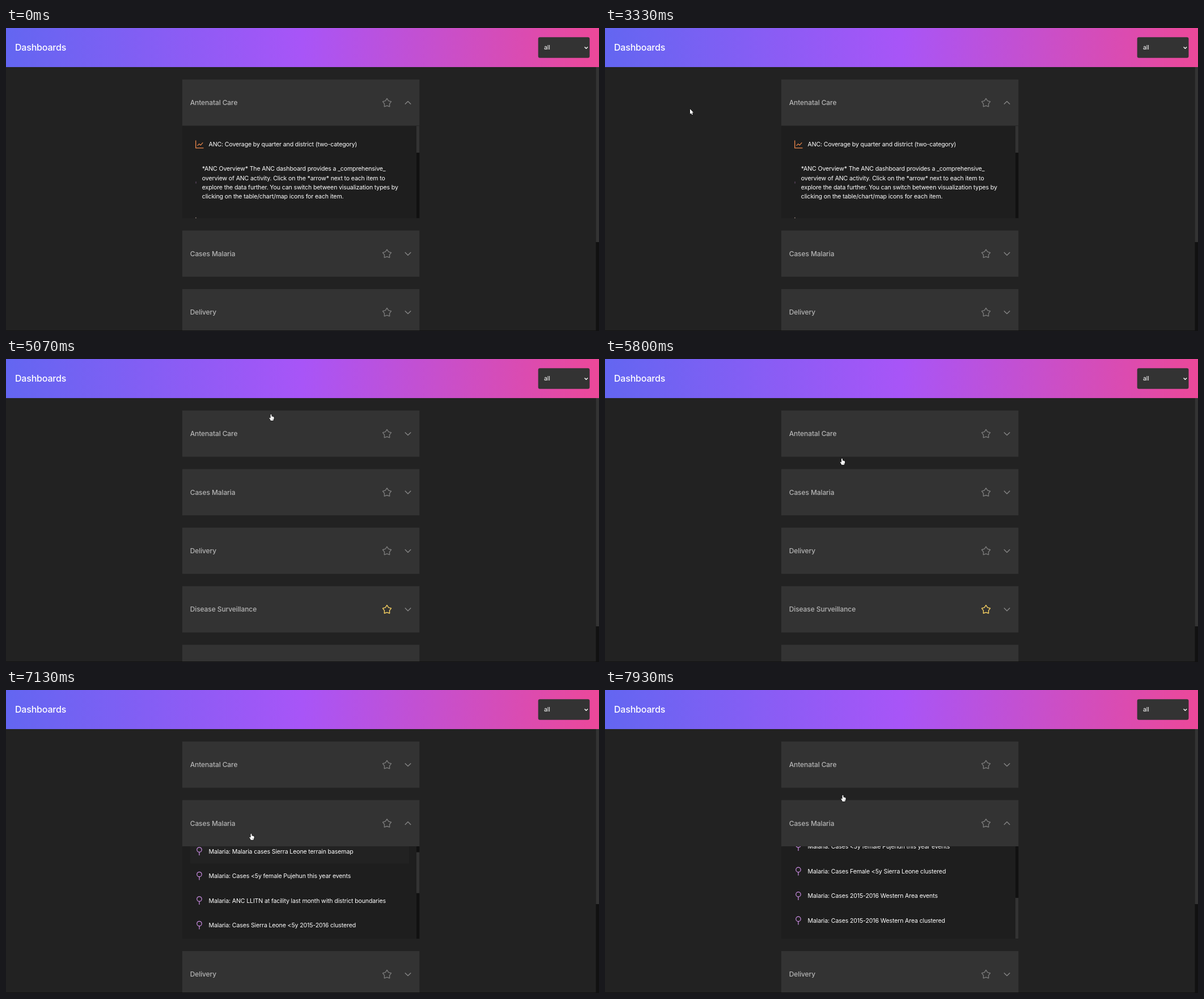
Animation of 1046 by 535 pixels, one loop 8 s. Source, as an HTML page with a canvas:

```html
<!DOCTYPE html>
<html lang="en">
<head>
<meta charset="utf-8">
<title>Dashboards</title>
<style>
  html, body { margin: 0; width: 100%; height: 100%; overflow: hidden; background: #222; }
  canvas { display: block; width: 1046px; height: 535px; }
</style>
</head>
<body>
<canvas id="stage"></canvas>
<script>
const W = 1046, H = 535, LOOP = 8000, TICK = 1000 / 15;
const canvas = document.getElementById('stage');
const ctx = canvas.getContext('2d');
const dpr = window.devicePixelRatio || 1;
canvas.width = W * dpr;
canvas.height = H * dpr;

const FONT = 'Inter, "Open Sans", sans-serif';
const LEFT = 311, RIGHT = 729.3, TOP = 91;
const CARD = 81.6, GAP = 21.8, PANEL = 163.2, ROW = 43.5;
const HEADER = 69;
const HIT_SHIFT = 23; // the drawn pointer sits above the point it hits

const cards = ['Antenatal Care', 'Cases Malaria', 'Delivery', 'Disease Surveillance', ''];
const overview = [
  '*ANC Overview* The ANC dashboard provides a _comprehensive_',
  'overview of ANC activity. Click on the *arrow* next to each item to',
  'explore the data further. You can switch between visualization types by',
  'clicking on the table/chart/map icons for each item.'
];
const maps = [
  'Malaria cases Sierra Leone terrain basemap',
  'Cases <5y female Pujehun this year events',
  'ANC LLITN at facility last month with district boundaries',
  'Cases Sierra Leone <5y 2015-2016 clustered',
  'Cases <5y female Pujehun this year events',
  'Cases Female <5y Sierra Leone clustered',
  'Cases 2015-2016 Western Area events',
  'Cases 2015-2016 Western Area clustered'
].map(s => 'Malaria: ' + s);

// time, x, y of the pointer tip
const pointerPath = [
  [600, 118, 78], [730, 129, 104], [870, 143, 131], [1000, 149, 142.5],
  [3300, 149, 142.5], [3333, 150, 143], [3400, 149.5, 143], [3540, 149.5, 143],
  [3670, 185, 128], [3800, 280, 88], [3930, 405, 58], [4070, 505, 55],
  [4130, 518, 64], [4200, 506, 80], [4270, 482, 92], [4333, 467.5, 97.5],
  [5270, 467.5, 97.5], [5400, 472, 104], [5530, 458, 125], [5670, 430, 160],
  [5800, 418, 175.5], [6067, 418, 175.5], [6333, 421.5, 179.5],
  [6540, 421.5, 179.5], [6730, 421.5, 187.5], [6800, 421.5, 187.5],
  [6930, 425, 208], [7067, 431, 245], [7133, 432.5, 253.5], [7600, 432.5, 253.5],
  [7730, 428, 234], [7870, 421, 196], [7933, 419.5, 185.5]
];
const scrollPath = [[7067, 0], [7133, 23], [7267, 92], [7400, 164], [7533, 205.8]];

function sample(keys, t) {
  if (t <= keys[0][0]) return keys[0].slice(1);
  for (let i = 1; i < keys.length; i++) {
    const a = keys[i - 1], b = keys[i];
    if (t <= b[0]) {
      const k = (t - a[0]) / (b[0] - a[0]);
      return a.slice(1).map((v, j) => v + (b[j + 1] - v) * k);
    }
  }
  return keys[keys.length - 1].slice(1);
}

function rect(x, y, w, h, color) {
  ctx.fillStyle = color;
  ctx.fillRect(x, y, w, h);
}

function text(s, x, y, size, color, weight = 400, spacing = -0.15) {
  ctx.font = `${weight} ${size}px ${FONT}`;
  ctx.letterSpacing = spacing + 'px';
  ctx.fillStyle = color;
  ctx.fillText(s, x, y);
}

const label = (s, x, y) => text(s, x, y, 10.6, '#fff');

function line(points, color, width, closed) {
  ctx.beginPath();
  points.forEach(([x, y]) => ctx.lineTo(x, y));
  if (closed) ctx.closePath();
  ctx.strokeStyle = color;
  ctx.lineWidth = width;
  ctx.stroke();
}

function star(x, y, color) {
  const points = [];
  for (let i = 0; i < 10; i++) {
    const r = i % 2 ? 4.7 : 7.9, a = -Math.PI / 2 + i * Math.PI / 5;
    points.push([x + r * Math.cos(a), y + 0.6 + r * Math.sin(a)]);
  }
  line(points, color, 1.35, true);
}

function chevron(x, y, up) {
  const d = up ? -2.6 : 2.6;
  line([[x - 5.2, y - d], [x, y + d], [x + 5.2, y - d]], '#858585', 1.4);
}

function chartIcon(x, y) {
  line([[x, y], [x, y + 13.2], [x + 13.8, y + 13.2]], '#ef8a4c', 1.3);
  line([[x + 3, y + 9.3], [x + 6, y + 6], [x + 8.5, y + 8.2], [x + 12.6, y + 3.8]], '#ef8a4c', 1.2);
}

function pinIcon(x, y) {
  ctx.beginPath();
  ctx.arc(x, y - 2.6, 4.2, 0, Math.PI * 2);
  ctx.strokeStyle = '#cf8fe8';
  ctx.lineWidth = 1.2;
  ctx.stroke();
  line([[x, y + 1.6], [x, y + 7.4]], '#cf8fe8', 1.2);
}

function drawHeader() {
  const g = ctx.createLinearGradient(0, 0, W, 0);
  g.addColorStop(0, '#6366f1');
  g.addColorStop(0.5, '#a855f7');
  g.addColorStop(1, '#ec4899');
  rect(0, 0, W, HEADER, g);
  text('Dashboards', 16, 40.2, 16, '#fff', 500, -0.2);
  ctx.beginPath();
  ctx.roundRect(938.7, 16.3, 90.8, 36.5, 3);
  ctx.fillStyle = '#333';
  ctx.fill();
  label('all', 949, 38.3);
  line([[1020.6, 33.4], [1023.4, 36.2], [1026.2, 33.4]], '#fff', 1.4);
}

function drawCard(i, y, open) {
  rect(LEFT, y, RIGHT - LEFT, CARD, '#333');
  const mid = y + CARD / 2;
  if (!cards[i]) return;
  text(cards[i], 324.7, mid + 4.4, 12, '#b4b4b4', 500, -0.1);
  star(672, mid, i === 3 ? '#fdd663' : '#7c7c7c');
  chevron(709, mid + 0.2, open);
}

function drawPanel(i, y, scroll, hitX, hitY) {
  ctx.save();
  ctx.beginPath();
  ctx.rect(LEFT, y, RIGHT - LEFT, PANEL);
  ctx.clip();
  rect(LEFT, y, RIGHT - LEFT, PANEL, '#1e1e1e');
  const content = i ? 369 : 560;
  rect(724, y, 6, PANEL, '#111');
  rect(724, y + scroll * PANEL / content, 6, PANEL * PANEL / content, '#333');
  if (i === 0) {
    chartIcon(334.7, y + 26);
    label('ANC: Coverage by quarter and district (two-category)', 357.5, y + 36.2);
    overview.forEach((s, n) => label(s, 345.8, y + 79.6 + n * 16.35));
    rect(334.6, y + 98.5, 0.9, 3.5, '#76577f');
    rect(334.2, y + 162, 1.4, 1.4, '#c9b5a8');
  } else {
    maps.forEach((s, n) => {
      const mid = y + 32.3 + n * ROW - scroll;
      const over = hitX > 325 && hitX < 711 && hitY >= y && Math.abs(hitY - mid) < ROW / 2;
      if (over) rect(324.7, mid - ROW / 2, 386.3, ROW, '#222');
      pinIcon(341, mid);
      label(s, 357.5, mid + 3.9);
    });
  }
  ctx.restore();
}

function drawArrow(x, y) {
  ctx.save();
  ctx.translate(x, y);
  const shape = [[0, 0], [0, 9], [2, 7.2], [3.4, 10.3], [4.9, 9.6], [3.5, 6.6], [6.2, 6.4]];
  line(shape, '#111', 1.2, true);
  ctx.fillStyle = '#fff';
  ctx.fill();
  ctx.restore();
}

function drawHand(x, y) {
  ctx.save();
  ctx.translate(x, y);
  const shape = [[-0.9, 0.8], [0, 0], [0.9, 0.8], [1, 3.8], [3.3, 4.2], [5, 5],
    [5.2, 7.5], [4.2, 9.8], [4, 11.3], [-0.8, 11.3], [-1.3, 9.6], [-3.3, 6.9], [-2.6, 6], [-0.9, 7.2]];
  line(shape, '#111', 1.2, true);
  ctx.fillStyle = '#fff';
  ctx.fill();
  line([[1.9, 8], [1.9, 10]], '#777', 0.5);
  line([[3.1, 8], [3.1, 10]], '#777', 0.5);
  ctx.restore();
}

function draw(now) {
  const t = Math.floor((now % LOOP + 5) / TICK) * TICK + 1;
  const open = t < 5066 ? 0 : t < 6066 ? -1 : 1;
  const [x, y] = sample(pointerPath, t);
  const [scroll] = sample(scrollPath, t);
  const hitY = y + HIT_SHIFT;

  ctx.setTransform(dpr, 0, 0, dpr, 0, 0);
  ctx.lineJoin = 'round';
  rect(0, 0, W, H, '#222');

  let top = TOP, onCard = false;
  cards.forEach((_, i) => {
    drawCard(i, top, i === open);
    let bottom = top + CARD;
    if (i === open) {
      drawPanel(i, bottom, i ? scroll : 0, x, hitY);
      bottom += PANEL;
    }
    if (x > LEFT && x < RIGHT && hitY > top && hitY < bottom) onCard = true;
    top = bottom + GAP;
  });

  rect(1040.5, HEADER, 5.5, H - HEADER, '#111');
  rect(1040.5, HEADER, 5.5, open < 0 ? 403 : 309, '#333');
  drawHeader();
  rect(0, 534, W, 1, '#111');
  if (t >= 600) (onCard ? drawHand : drawArrow)(x, y);
}

const start = performance.now();
function frame() {
  draw(performance.now() - start);
  requestAnimationFrame(frame);
}
frame();
</script>
</body>
</html>
```
